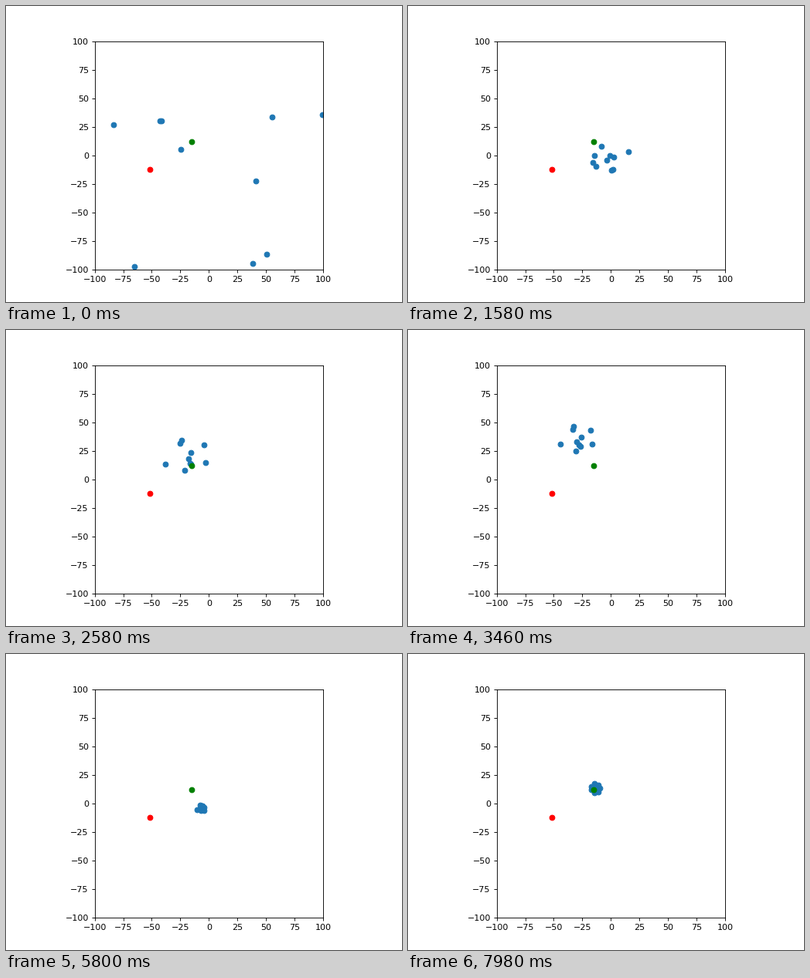
Recreate the animation shown at these times as a matplotlib script. Size 512 by 384 pixels, loop 8 s.

```python
import numpy as np
import matplotlib.pyplot as plt
from matplotlib.animation import FuncAnimation

FRAMES = 400
GOAL = np.array([-15, 12.2])
OTHER = np.array([-51.5, -12.2])

# The swarm as a whole swings around the goal.
SWING = np.array([-14.5, 23.3])
PEAK = np.array([192, 185])
OMEGA = np.pi / 141

# Each particle passes two points, then spirals in as a damped oscillation.
EARLY = 38
START_X = [38.5, -65, -83.5, -41.5, 55.5, -24.5, 98.9, 50.5, 41, -43]
START_Y = [-94.5, -97.5, 27, 30.2, 33.7, 5.3, 35.7, -86.5, -22.2, 30.2]
EARLY_X = [23, -48, -51.5, 0, 9.5, -5.5, 76.3, 29, -7.5, -6.2]
EARLY_Y = [-61.5, -46.7, 8, 7.4, 29, -7.4, 16.2, -56.2, -29, 9.5]


def centre(t):
    return GOAL + SWING * np.cos(OMEGA * (t - PEAK))


def circle(n, radius, first):
    a = np.radians(first - 360 / n * np.arange(n))
    return radius * np.column_stack([np.cos(a), np.sin(a)])


def damped(t):
    return np.exp(-0.0126 * t) * np.sin(0.03 * t)


start = np.column_stack([START_X, START_Y]) - centre(0)
early = np.column_stack([EARLY_X, EARLY_Y]) - centre(EARLY)
packed = np.vstack([circle(7, 3.7, 100), circle(3, 1.4, 90)])


def positions(t):
    from_start = (1 - t / EARLY) * np.exp(-(t / 56) ** 2)
    from_early = damped(t) / damped(EARLY)
    settle = 1 - np.exp(-(t / 150) ** 2)
    return (centre(t) + start * from_start + early * from_early
            + packed * settle)


fig, ax = plt.subplots(figsize=(6.4, 4.8), dpi=80)
ax.set_aspect("equal")
ax.set(xlim=(-100, 100), ylim=(-100, 100))
ticks = np.arange(-100, 101, 25)
ax.set_xticks(ticks)
ax.set_yticks(ticks)

swarm, = ax.plot([], [], "o", color="tab:blue")
ax.plot(*OTHER, "o", color="red")
ax.plot(*GOAL, "o", color="green")


def update(frame):
    swarm.set_data(*positions(frame).T)
    return swarm,


anim = FuncAnimation(fig, update, frames=FRAMES, interval=20,
                     repeat=True, repeat_delay=0)
plt.show()
```
